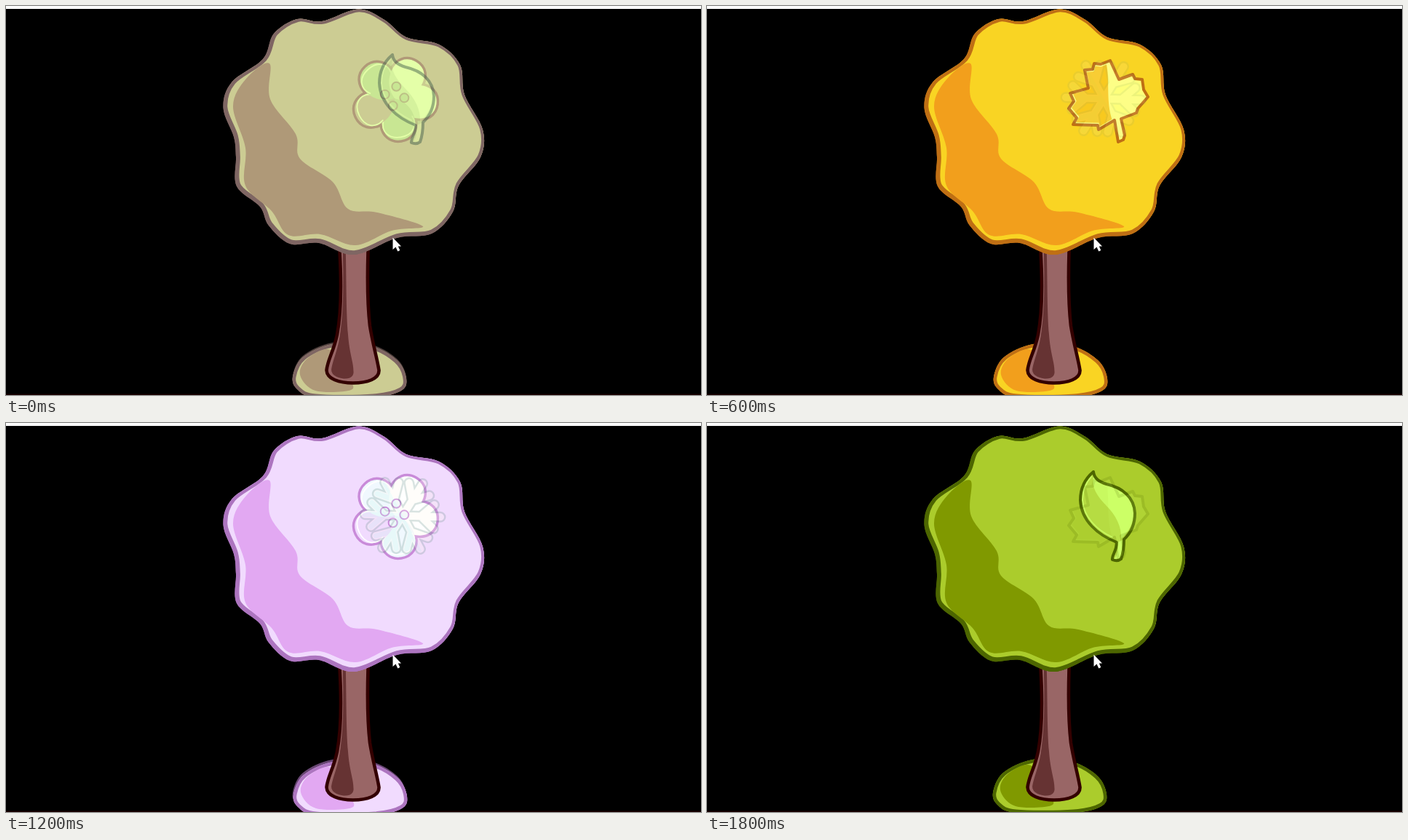
An HTML page for the animation above (2.1 s loop, 955x535 px).

```html
<!DOCTYPE html>
<html lang="en">
<head>
<meta charset="utf-8">
<title>Tree through the seasons</title>
<style>
  html, body { margin: 0; width: 100%; height: 100%; overflow: hidden; background: #000; }
  svg { display: block; width: 100%; height: 100%; }
  .light { fill: var(--light); }
  .shade { fill: var(--shade); }
  .line { fill: var(--line); }
  .rim { fill: var(--light); stroke: var(--line); }
  .mid { fill: var(--mid); }
  .glow { fill: var(--glow); }
  .edge { fill: none; stroke: var(--icon); stroke-width: 4; stroke-linejoin: round; }
  .gleam { fill: none; stroke: var(--glow); stroke-width: 1.8; stroke-linecap: round; }
  #flower .edge { stroke: var(--petal); stroke-width: 7; }
  #flower circle { fill: var(--mid); stroke: var(--petal); stroke-width: 2; }
  #snow path { fill: none; stroke-linecap: round; stroke-linejoin: round; }
</style>
</head>
<body>
<svg id="stage" viewBox="0 0 955 535" preserveAspectRatio="none">
  <defs>
    <path id="crown"/>
    <path id="mound"/>
    <path id="leafShape" d="M531 67Q513 82 513 106C514 134 537 154 563 164C563 176 556 182 557 188Q564 191 569 187Q573 176 573 160Q588 146 588 124C587 102 571 89 549 84Q532 79 531 67Z"/>
    <path id="mapleShape" d="M519 88L530 87L532 79L541 80L554 75L566 101L585 94L588 100L598 101L600 115L606 125L592 141L590 147L569 155L574 178L572 184L565 187L560 157L538 170L537 164L503 163L508 154L497 141L504 131L499 120L524 113Z"/>
    <path id="petal" d="M0 0C12 -30 58 -31 58 0S12 30 0 0Z"/>
    <clipPath id="crownClip"><use href="#crown"/></clipPath>
    <clipPath id="moundClip"><use href="#mound"/></clipPath>
    <clipPath id="mapleRight"><path d="M546 70C556 95 546 130 558 160L566 190H620V70Z"/></clipPath>
    <linearGradient id="frost" gradientUnits="userSpaceOnUse" x1="501" y1="150.5" x2="589" y2="103.5">
      <stop offset=".5" stop-color="#cffaec"/>
      <stop offset=".5" stop-color="#fff8ee"/>
    </linearGradient>
  </defs>
  <rect width="955" height="535"/>
  <rect y="533.5" width="955" height="1.5" fill="#1a0000"/>
  <rect width="955" height="4" fill="#fff"/>

  <use id="moundGhost" href="#mound" class="line" opacity=".6"/>
  <g id="ground">
    <use href="#mound" class="line"/>
    <use href="#mound" class="rim" stroke-width="9" clip-path="url(#moundClip)"/>
    <path id="moundShade" class="shade"/>
  </g>

  <path d="M458.5 330V338C461 380 461 420 455 452C450 476 442 486 440.5 501C441 513 458 518.5 477 518.5S513 513 512.5 501C510 485 504 465 500 440C496 405 496.5 370 497.5 338V330Z"
    fill="#966" stroke="#300" stroke-width="4.6"/>
  <path d="M462.5 330H466.5C468 370 467 420 470 452C472 480 478 490 477.5 505Q476 513 464 512.5Q447 510 447 500C449 487 455 476 458.5 455C464 420 464 380 462.5 330Z" fill="#633"/>

  <use href="#crown" class="line"/>
  <g clip-path="url(#crownClip)">
    <use href="#crown" class="rim" stroke-width="9.6" transform="translate(1 -1)"/>
  </g>
  <path id="crownShade" class="shade"/>

  <g id="flower"></g>

  <g id="leaf">
    <use href="#leafShape" class="mid"/>
    <path class="glow" d="M531 74Q538 84 549 86C569 91 586 104 586 124Q586 144 569 159C570 143 562 127 549 114C536 101 528 88 531 74ZM564 164L571 161Q571 178 567 186L560 187Q566 178 564 164Z"/>
    <path class="gleam" d="M528 74Q516 87 516 106C517 128 535 147 557 157"/>
    <use href="#leafShape" class="edge"/>
  </g>

  <g id="maple">
    <use href="#mapleShape" class="mid"/>
    <use href="#mapleShape" class="glow" clip-path="url(#mapleRight)"/>
    <use href="#mapleShape" class="gleam" transform="translate(548 125) scale(.94) translate(-548 -125)"/>
    <use href="#mapleShape" class="edge"/>
  </g>

  <g id="snow"></g>

  <path d="M531.5 318.5V335L535.5 331.500L538.300 337.500L541.300 336L538.800 330.500H543Z" fill="#fff"/>
</svg>
<script>
const $ = id => document.getElementById(id);

// Closed Catmull-Rom curve through a few key points.
function smooth(text) {
  const pts = text.trim().split(/\s+/).map(p => p.split(',').map(Number));
  const at = i => pts[(i + pts.length) % pts.length];
  return 'M' + pts[0] + pts.map((p, i) => {
    const before = at(i - 1), next = at(i + 1), after = at(i + 2);
    const c1 = p.map((v, k) => v + (next[k] - before[k]) / 6);
    const c2 = next.map((v, k) => v - (after[k] - p[k]) / 6);
    return `C${c1} ${c2} ${next}`;
  }).join('') + 'Z';
}

const outlines = {
  crown: `484,4.5 520,19 550,43 595,53 624,81 630,122 655,170 652,208 622,247
    614,283 585,313 537,319 478,342 430,326 390,327 361,302 349,276 317,248 316,208
    313,180 298.5,140 310,105 353,73 368,38 400,18 434,21`,
  crownShade: `362,79 363,128 398,176 404,210 449,242 470,279 510,284 573,303 530,309
    480,329 432,314 388,315 365,282 329,247 329,195 312,138 330,100`,
  mound: '394,508 408,481 448,463 500,465 537,485 550,510 543,527 505,536 425,536 400,525',
  moundShade: '404,505 415,482 446,471 470,508 474,526 425,527'
};
for (const id in outlines) $(id).setAttribute('d', smooth(outlines[id]));

function polar(cx, cy, radius, degrees) {
  const a = degrees * Math.PI / 180;
  return [cx + radius * Math.cos(a), cy + radius * Math.sin(a)];
}

function flower(cx, cy) {
  const fills = ['glow', 'mid', 'light', 'mid', 'glow'];
  const petals = body => fills.map((fill, k) =>
    `<g transform="translate(${cx} ${cy}) rotate(${8 + 73 * k})">${body(fill)}</g>`).join('');
  const seeds = [0, 1, 2, 3].map(k => {
    const [x, y] = polar(534, 124, 13.5, 10 + 90 * k);
    return `<circle cx="${x}" cy="${y}" r="6"/>`;
  });
  return petals(() => '<use href="#petal" class="edge"/>')
    + petals(fill => `<use href="#petal" class="${fill}"/>`
      + (fill === 'glow' ? '' : '<path class="gleam" d="M28 20C42 26 54 17 54 0S42 -26 28 -20"/>'))
    + seeds.join('');
}
$('flower').innerHTML = flower(534, 127);

function snowflake(cx, cy) {
  let d = '';
  for (let angle = 2; angle < 360; angle += 60) {
    const at = (radius, turn) => polar(cx, cy, radius, angle + turn);
    d += `M${[cx, cy]}L${at(52, 0)}M${at(46, 21)}L${at(25, 0)}L${at(46, -21)}`;
  }
  return d;
}
const flake = snowflake(545, 127.5);
$('snow').innerHTML = [['#6b948b', 15], ['#fff8ee', 10], ['url(#frost)', 7]]
  .map(([stroke, width]) => `<path d="${flake}" stroke="${stroke}" stroke-width="${width}"/>`).join('');

const fade = {
  light: '#cccc93', shade: '#af9978', line: '#7f6663', glow: '#e4ffa8', mid: '#c8e693',
  petal: '#b09978', icon: '#4b6650',
  icons: { flower: 1, leaf: .5 }, ground: [0, 2], ghost: true
};
const looks = [
  fade,
  { light: '#bbcc22', shade: '#999900', line: '#666600', glow: '#ddff66', mid: '#c4d634',
    icons: { leaf: 1, maple: .3 }, ground: [-1, 0] },
  { light: '#f9d423', shade: '#f29f1c', line: '#bf6f14', glow: '#fdff7a', mid: '#f8c91f',
    icons: { maple: 1, snow: .1 }, ground: [0, 2] },
  { light: '#cffaec', shade: '#9fc6bb', line: '#6b948b', icons: { snow: 1 }, ground: [2, 4] },
  { light: '#f1dbfe', shade: '#e2a8f2', line: '#ad75c0', glow: '#ffffff', mid: '#f0f8fe',
    petal: '#c98bd9', icons: { flower: 1, snow: .25 }, ground: [1, 3], ghost: true },
  fade,
  { light: '#abcc2c', shade: '#809900', line: '#4d6600', glow: '#ccff66', mid: '#b6dc42',
    icons: { leaf: 1, maple: .15 }, ground: [-1, 0] }
];

const FRAME = 300;
const stage = $('stage');

function show(look) {
  const colours = { icon: look.line, ...look };
  for (const name of ['light', 'shade', 'line', 'glow', 'mid', 'petal', 'icon'])
    stage.style.setProperty('--' + name, colours[name] || look.light);
  for (const id of ['flower', 'leaf', 'maple', 'snow'])
    $(id).style.opacity = look.icons[id] || 0;
  $('ground').setAttribute('transform', `translate(${look.ground})`);
  $('moundGhost').style.display = look.ghost ? '' : 'none';
}

const start = performance.now();
function tick() {
  const step = Math.floor((performance.now() - start) / FRAME);
  show(looks[step % looks.length]);
  requestAnimationFrame(tick);
}
tick();
</script>
</body>
</html>
```
